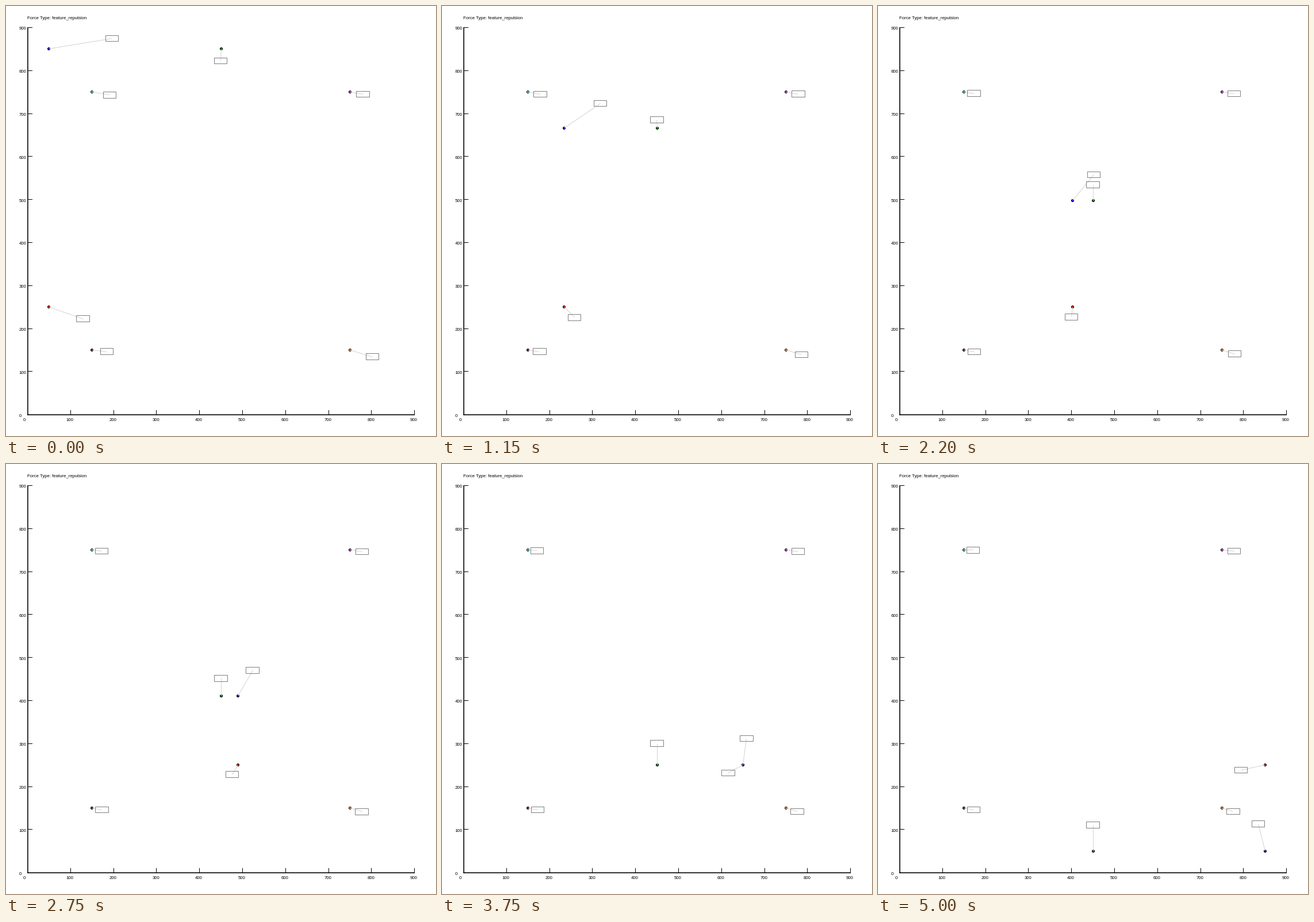
A matplotlib script for the animation above (5.05 s loop, 748 by 748 pixels).

```python
from collections import namedtuple

import numpy as np
import matplotlib.pyplot as plt
from matplotlib.animation import FuncAnimation
from matplotlib.patches import Circle, Rectangle

SIZE = 748
SCALE = SIZE / 1000
FRAMES = 101
PX = 0.72                      # points per pixel at 100 dpi
BOX = 22.4 + 10.5j             # label box size in pixels
REACH = 25                     # distance at which a point pushes a label

# Positions are complex numbers. A label's offset from its point is
#   rest + drift * n + bend * n^2 + kick * (a decay over tau frames)
Point = namedtuple("Point", "color start step rest kick tau drift bend",
                   defaults=(24, 0, 0))
POINTS = [
    Point("purple", 150 + 150j, 0, 16.8 + 2.9j, 8.9 - 0.3j),
    Point("cyan", 150 + 750j, 0, 15.6 + 4.2j, 15.3 + 1.2j, drift=-0.04j),
    Point("magenta", 750 + 750j, 0, 20.9 + 3.9j, 1.7, drift=-0.02j),
    Point("orange", 750 + 150j, 0, 19.4 + 6.1j, 19.9 + 5.5j),
    Point("green", 450 + 850j, -8j, 0.1 - 15j, -0.6 + 35.5j, 16, -0.3j),
    Point("red", 50 + 250j, 8, 41 + 17.8j, 18.4 + 2.6j, 6,
          -1.07 + 0.05j, 0.0024 - 0.00137j),
    Point("blue", 50 + 850j, 8 - 8j, 96 - 42.5j, 13.4 + 24j, 7,
          -1.54 - 0.045j, 0.0046),
]


def sx(x):
    return (x + 50) * SCALE


def sy(y):
    return (950 - y) * SCALE


def snap(v):
    """Centre of the pixel that holds v."""
    return np.floor(v) + 0.5


def snap_xy(z):
    return snap(z.real), snap(z.imag)


def place(p, n):
    at = p.start + p.step * n
    dot = complex(sx(at.real), sy(at.imag))
    decay = np.exp(-(n / p.tau) ** 1.2)
    return dot, dot + p.rest + p.drift * n + p.bend * n**2 + p.kick * decay


fig = plt.figure(figsize=(SIZE / 100, SIZE / 100), dpi=100, facecolor="white")
ax = fig.add_axes([0, 0, 1, 1])
ax.set_xlim(0, SIZE)
ax.set_ylim(SIZE, 0)
ax.axis("off")


def line(xs, ys, color, width, z=1):
    return ax.plot(xs, ys, color=color, lw=width * PX, zorder=z, snap=False,
                   solid_capstyle="butt", solid_joinstyle="miter")[0]


def label(x, y, text):
    ax.text(x, y, text, family="Liberation Sans", size=7.8 * PX,
            ha="left", va="baseline", color="black")


line([37.9, 37.9], [37, 712], "black", 1.6)
line([37, 711], [711.1, 711.1], "black", 1.6)
for v in range(0, 901, 100):
    if v:
        line([snap(sx(v))] * 2, [711, 703], "black", 1)
        line([38, 46], [snap(sy(v))] * 2, "black", 1)
    label(sx(v - 10), 722, str(v))
    label(sx(-20), sy(v) + 4, str(v))
label(sx(0), 22.5, "Force Type: feature_repulsion")

dots, boxes, leaders, arrows = [], [], [], []
for i, p in enumerate(POINTS):
    dots.append(ax.add_patch(Circle((0, 0), 2, fc=p.color, ec="black", lw=PX,
                                    zorder=3 + i / 10, snap=False)))
    boxes.append(ax.add_patch(Rectangle((0, 0), 1, 1, fill=False, ec="gray",
                                        lw=PX, zorder=5, snap=False)))
    leaders.append(line([], [], "lightgray", 1, 4))
    arrows.append(line([], [], "orange", 1.5, 6))


def push(center, others):
    """Summed force of nearby points, strongest when almost touching."""
    total = 0
    for d in (dot - center for dot in others):
        r = abs(d)
        if r < REACH:
            total += d / max(r, 0.1) * max(1.92 * r, 380 / max(r, 3.2))
    return total


def arrow_path(base, force):
    tip = base + force
    back = -7 * force / abs(force)
    left, right = (tip + back * np.exp(a * 1j) for a in (0.55, -0.55))
    return np.array([base, tip, left, tip, right])


def update(n):
    spots = [place(p, n) for p in POINTS]
    for i, (dot, center) in enumerate(spots):
        dots[i].center = snap_xy(dot)
        x0, y0 = snap_xy(center - BOX / 2)
        x1, y1 = snap_xy(center + BOX / 2)
        boxes[i].set_bounds(x0, y0, x1 - x0, y1 - y0)
        leaders[i].set_data(*zip(snap_xy(dot), snap_xy(center)))
        force = push(center, [s[0] for j, s in enumerate(spots) if j != i])
        path = arrow_path(center, force) if force else np.array([])
        arrows[i].set_data(path.real, path.imag)
    return dots + boxes + leaders + arrows


anim = FuncAnimation(fig, update, frames=FRAMES, interval=50,
                     repeat=True, repeat_delay=0, blit=False)
plt.show()
```
